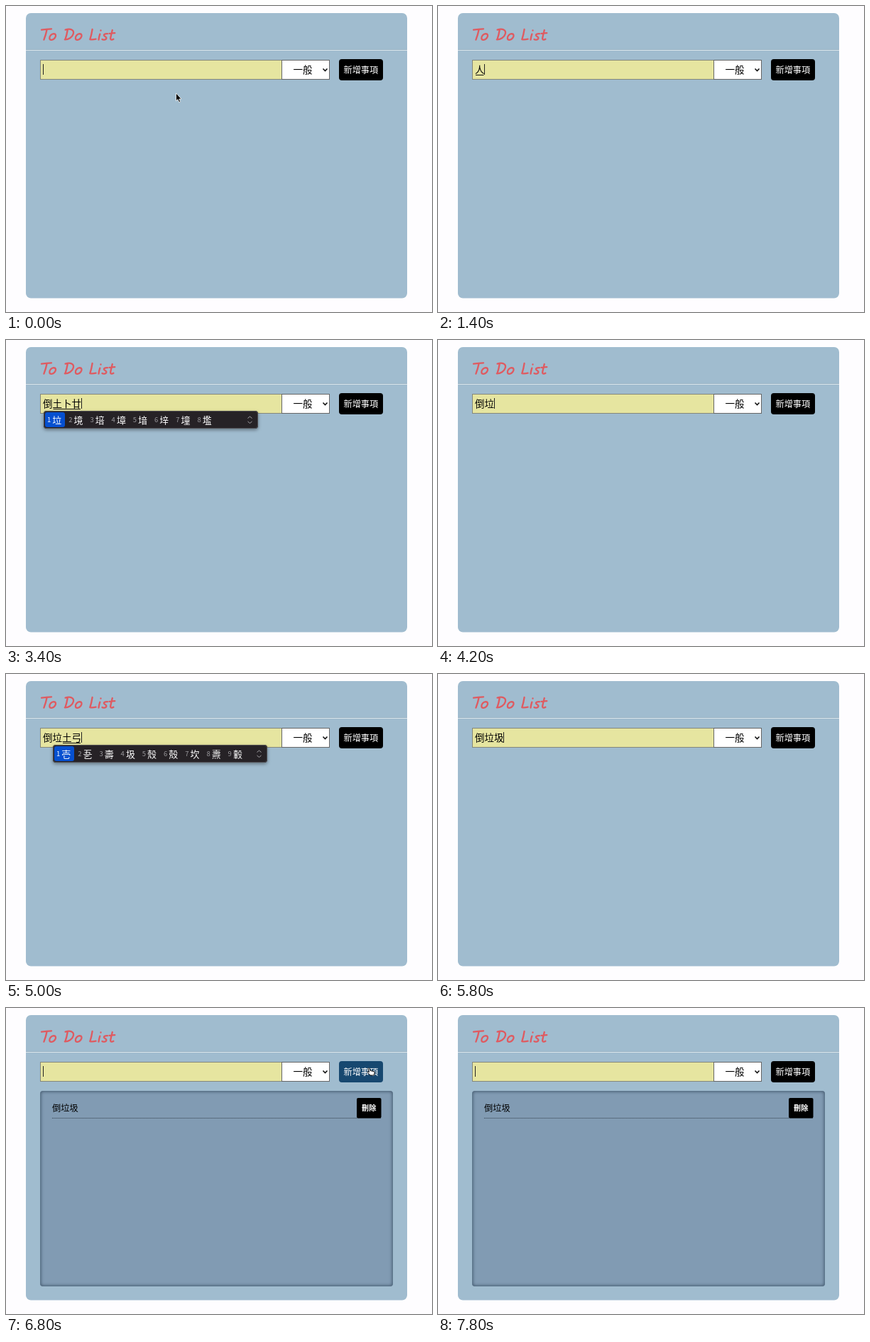
Animation of 600x432 px, one loop 8 s. Source, as an HTML page:

```html
<!DOCTYPE html>
<html lang="zh-Hant">
<head>
<meta charset="utf-8">
<title>To Do List</title>
<style>
  html, body { margin: 0; width: 100%; height: 100%; overflow: hidden; background: #fefdff; }
  svg { display: block; }
  text { font-family: "Noto Sans CJK TC", "Noto Sans CJK SC", "Noto Sans CJK JP", "Noto Sans CJK", sans-serif; }
  .lettering path { fill: none; stroke: #df5a60; stroke-width: 2.3; stroke-linecap: round; stroke-linejoin: round; }
  .field { font-size: 13.5px; font-weight: 500; }
  .button { fill: #fff; font-weight: 500; }
</style>
</head>
<body>
<svg width="600" height="432" viewBox="0 0 600 432">
  <defs>
    <filter id="soft" x="-10%" y="-50%" width="120%" height="220%">
      <feDropShadow dx="0" dy="2" stdDeviation="2.5" flood-opacity=".4"/>
    </filter>
    <filter id="blur"><feGaussianBlur stdDeviation="2"/></filter>
    <clipPath id="listClip"><rect x="48" y="117" width="497" height="276" rx="4"/></clipPath>
  </defs>

  <rect x="28" y="10" width="537" height="402.5" rx="7" fill="#a0bccf"/>
  <path d="M28 62.5H565" stroke="#dce6ec"/>
  <path d="M28 61.5H565" stroke="#92abbc" stroke-opacity=".6"/>

  <g class="lettering" role="img" aria-label="To Do List">
    <path d="M50 33.6Q57 32.6 64 32.3M57.6 33.2Q56 41 53.4 47.6"/>
    <path d="M67.5 39.2C64 38.8 61 43 61.3 45.6C61.7 49 66.5 48.3 68.8 45C71 41.7 70.3 39 66.8 39.3"/>
    <path d="M86.8 33.5Q85.6 41 83.4 47.3M83.6 33.6C91 31 96.2 34 94.8 39.2C93.4 44.2 88 47.6 82.8 47.4"/>
    <path d="M104 39.2C100.500 38.8 97.6 43 97.900 45.600C98.300 49 103 48.300 105.300 45C107.500 41.700 106.800 39 103.300 39.300"/>
    <path d="M121.600 32.800Q120.400 41 118.300 47.200Q122.500 47.800 126.600 46.700"/>
    <path d="M132.300 39.600Q131 43.500 130.500 47.600M133.500 34.400V34.700"/>
    <path d="M143 39.200C139.500 38.800 137.300 40.300 138.300 42C139.200 43.400 141.800 43.300 141.400 45.500C141 47.900 137.700 48.200 135.500 47"/>
    <path d="M149.800 34Q148 41 147.200 45.300C146.900 48 149.400 48 151.400 46.800M145.500 38.900Q149.500 38.200 153.300 38.200"/>
  </g>

  <rect id="input" x="48.500" y="76.500" width="340" height="27" stroke="#85887a"/>
  <text id="value" class="field" x="52" y="95"></text>
  <path id="underline" stroke="#111"/>
  <path id="caret" stroke="#222"/>

  <rect x="388.500" y="76.500" width="67" height="27" fill="#fff" stroke="#666"/>
  <text class="field" x="404.500" y="95">一般</text>
  <path d="M446.500 88.500l3 3 3-3" fill="none" stroke="#111" stroke-width="1.600"/>

  <rect id="addButton" x="469" y="75" width="62" height="30" rx="4"/>
  <text class="button" x="475.500" y="94.700" font-size="12.200">新增事項</text>

  <g id="list">
    <rect x="48" y="117" width="497" height="276" rx="4" fill="#819bb3"/>
    <g clip-path="url(#listClip)">
      <rect x="47" y="116" width="499" height="278" rx="5" fill="none" stroke="#3e5268" stroke-width="4" filter="url(#blur)"/>
    </g>
    <text x="65" y="146" font-size="12.300" font-weight="500">倒垃圾</text>
    <path d="M65 155.500H528" stroke="#34404c" stroke-dasharray="1 1"/>
    <rect x="494" y="127" width="34.500" height="28.500" rx="2"/>
    <text class="button" x="501" y="145" font-size="10.200" style="font-weight:700">刪除</text>
  </g>

  <g id="popup">
    <rect y="100" width="302" height="25" rx="4" fill="#262427" filter="url(#soft)"/>
    <rect x=".5" y="100.500" width="301" height="24" rx="3.500" fill="none" stroke="#4b4a4e"/>
    <rect x="2" y="102" width="28" height="21" rx="3" fill="#0650d0"/>
    <g id="candidates"></g>
    <path d="M287.500 110.500l3-2.500 3 2.500M287.500 115l3 2.500 3-2.500" fill="none" stroke="#a5a4a8"/>
  </g>

  <path id="arrow" d="M0 0V11L2.500 8.800L4.300 13L6.200 12.200L4.400 8.200H7.500Z" fill="#000" stroke="#fff" stroke-width=".8"/>
  <path id="hand" d="M1 1.500Q2-.5 3 1.500L4 4.500L9 5.500Q10.500 6 10 8L9 11H4L0 6.500Q0 5 2.500 6.500Z" fill="#fff" stroke="#111"/>
</svg>

<script>
const LOOP = 8000, STEP = 200, CHAR = 13.5, TEXT_X = 52;
const $ = id => document.getElementById(id);
const show = (id, visible) => $(id).style.display = visible ? '' : 'none';

// time, committed text, text being composed, candidates
const typing = [
  [0, '', '', ''],
  [1200, '', '人', ''],
  [1600, '', '人一', '丘仜乒兵岳邱佢倒'],
  [1800, '', '人一土', '倒俓侄佂偅'],
  [2000, '', '人一土弓', '倒'],
  [2200, '倒', '', ''],
  [3000, '倒', '土', ''],
  [3200, '倒', '土卜', '卦垃境培墇堷垶墥'],
  [3400, '倒', '土卜廿', '垃境培墇堷垶墥壏'],
  [3800, '倒垃', '', ''],
  [4600, '倒垃', '土', ''],
  [5000, '倒垃', '土弓', '壱㐏壽圾殼殻坎燾轂'],
  [5400, '倒垃', '土弓竹', '圾殼殻轂'],
  [5600, '倒垃', '土弓竹水', '圾'],
  [5800, '倒垃圾', '', ''],
  [6800, '', '', '']
];

// time, x, y of the pointer tip
const pointerPath = [
  [0, 239.5, 123], [1200, 239.5, 123],
  [6200, 400, 112], [6400, 502, 88], [6600, 509, 84], [6800, 509, 84],
  [7000, 370, 108], [7200, 239.5, 123], [8000, 239.5, 123]
];

function pointerAt(t) {
  const i = pointerPath.findLastIndex(p => p[0] <= t);
  const [t0, x0, y0] = pointerPath[i];
  const [t1, x1, y1] = pointerPath[i + 1];
  const k = (t - t0) / (t1 - t0);
  return [x0 + (x1 - x0) * k, y0 + (y1 - y0) * k];
}

function candidateMarkup(chars) {
  return [...chars].map((char, i) => {
    const x = 5 + i * 30.2;
    return `<text x="${x}" y="116" font-size="9.5" fill="${i ? '#99989c' : '#fff'}">${i + 1}</text>` +
      `<text x="${x + 7.3}" y="117.500" font-size="13" font-weight="500" fill="#fff">${char}</text>`;
  }).join('');
}

function draw(t) {
  const [since, done, composing, candidates] = typing.findLast(row => row[0] <= t);
  const focused = t < 6600 || t >= 6800;
  const start = TEXT_X + done.length * CHAR;
  const end = start + composing.length * CHAR;

  $('value').textContent = done + composing;
  $('input').setAttribute('fill', focused ? '#e6e5a0' : '#fff');
  $('underline').setAttribute('d', composing ? `M${start + 1} 97.500H${end - 1}` : '');
  $('caret').setAttribute('d', `M${Math.floor(end) + .5} 82V97`);
  show('caret', focused && (composing || (t - since) % 1000 < 500));

  show('popup', candidates);
  $('popup').setAttribute('transform', `translate(${Math.round(start - 13)})`);
  $('candidates').innerHTML = candidateMarkup(candidates);

  const hovering = t >= 6400 && t < 7000;
  $('addButton').setAttribute('fill', hovering ? '#174870' : '#000');
  show('list', t >= 6800);

  const [x, y] = pointerAt(t);
  const pointerVisible = t < 1200 || (t >= 6200 && t < 7600);
  for (const id of ['arrow', 'hand']) {
    $(id).setAttribute('transform', `translate(${x} ${y})`);
    show(id, pointerVisible && (id === 'hand') === hovering);
  }
}

const began = performance.now();
function frame() {
  const t = (performance.now() - began) % LOOP;
  draw(Math.floor(t / STEP) * STEP);
  requestAnimationFrame(frame);
}
frame();
</script>
</body>
</html>
```
